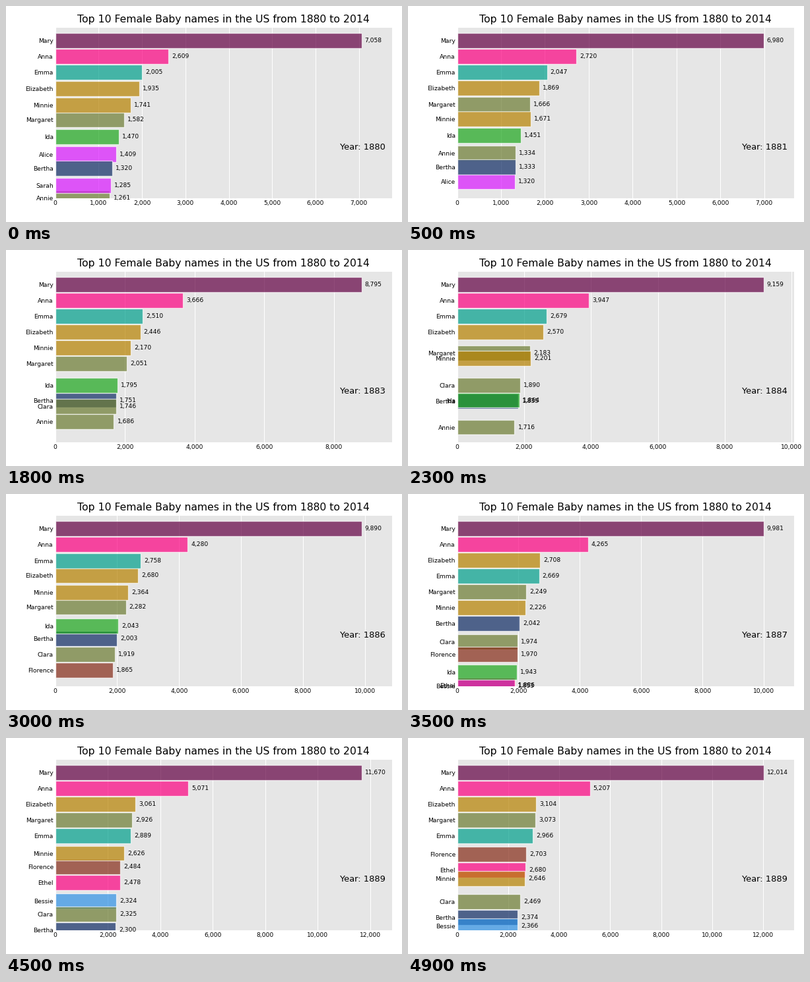
Animation of 600 by 328 pixels, one loop 5000 ms. Source, as a matplotlib script:

```python
import matplotlib.pyplot as plt
import numpy as np
from matplotlib.animation import FuncAnimation
from matplotlib.ticker import MultipleLocator, StrMethodFormatter

DPI = 64
PT = 93.75 / DPI  # type and line sizes are set for 93.75 dpi
FIRST_YEAR, N_YEARS, N_BARS = 1880, 11, 10
STEPS_PER_YEAR = 5

OLIVE, OCHRE, PINK, VIOLET = "#6C7C32", "#B68100", "#FC0080", "#DA16FF"

# name: (colour, first year counted, births per year)
BIRTHS = {
    "Alice": (VIOLET, 1880, [1414, 1308, 1542, 1488]),
    "Anna": (PINK, 1880, [2604, 2698, 3143, 3306, 3860, 3994, 4283, 4227,
                          4982, 5062, 5233]),
    "Annie": (OLIVE, 1880, [1258, 1326, 1492, 1589, 1739, 1703, 1740]),
    "Bertha": ("#0D2A63", 1880, [1320, 1324, 1508, 1681, 1789, 1860, 2002,
                                 2020, 2450, 2295, 2388]),
    "Bessie": ("#2E91E5", 1887, [1830, 2286, 2321, 2374]),
    "Clara": (OLIVE, 1880, [1226, 1242, 1490, 1548, 1852, 1910, 1917, 1960,
                            2231, 2316, 2496]),
    "Elizabeth": (OCHRE, 1880, [1939, 1852, 2187, 2255, 2549, 2582, 2680,
                                2681, 3224, 3058, 3112]),
    "Emma": ("#00A08B", 1880, [2003, 2034, 2303, 2367, 2587, 2728, 2764,
                               2647, 3087, 2884, 2980]),
    "Ethel": (PINK, 1887, [1860, 2373, 2465, 2718]),
    "Florence": ("#862A16", 1885, [1641, 1861, 1945, 2442, 2470, 2744]),
    "Ida": ("#1CA71C", 1880, [1472, 1439, 1673, 1634, 1882, 1854, 2049,
                              1929, 2200]),
    "Margaret": (OLIVE, 1880, [1578, 1658, 1821, 1881, 2142, 2205, 2286,
                               2215, 2904, 2917, 3100]),
    "Mary": ("#620042", 1880, [7065, 6919, 8148, 8012, 9217, 9128, 9890,
                               9888, 11754, 11648, 12078]),
    "Minnie": (OCHRE, 1880, [1746, 1653, 2004, 2035, 2243, 2178, 2372, 2203,
                             2653, 2625, 2650]),
    "Sarah": (VIOLET, 1880, [1288, 1226]),
}

names = list(BIRTHS)
colors = [color for color, _, _ in BIRTHS.values()]
values = np.zeros((N_YEARS, len(names)))
for col, (_, start, counts) in enumerate(BIRTHS.values()):
    row = start - FIRST_YEAR
    values[row:row + len(counts), col] = counts

# Slot 10 is the top bar; everything outside the top ten waits in slot 0.
ranks = (-values).argsort(axis=1).argsort(axis=1)
slots = np.clip(N_BARS - ranks, 0, None)

plt.rcParams.update({
    "font.family": "DejaVu Sans",
    "axes.spines.left": False, "axes.spines.right": False,
    "axes.spines.top": False, "axes.spines.bottom": False,
    "axes.facecolor": "0.9", "axes.axisbelow": True,
    "axes.grid": True, "axes.grid.axis": "x",
    "grid.color": "white", "grid.linewidth": 0.8 * PT,
    "axes.titlesize": 12 * PT, "axes.titlepad": 6 * PT,
    "xtick.labelsize": 7 * PT, "ytick.labelsize": 7 * PT,
    "xtick.major.size": 0, "ytick.major.size": 0,
    "xtick.major.pad": 2 * PT, "ytick.major.pad": 2 * PT,
})

fig = plt.figure(figsize=(600 / DPI, 328 / DPI), dpi=DPI, facecolor="white")
left, bottom, right, top = 74.5 / 600, 0.11, 0.975, 0.9
ax = fig.add_axes([left, bottom, right - left, top - bottom])


def blend(table, year, part):
    return table[year] * (1 - part) + table[year + 1] * part


def draw(frame):
    year, step = divmod(frame, STEPS_PER_YEAR)
    part = 0.05 + step / STEPS_PER_YEAR
    slot, length = blend(slots, year, part), blend(values, year, part)
    shown = np.flatnonzero(slot > 1e-6)
    limit = 1.1 * length.max()

    ax.clear()
    ax.barh(slot[shown], length[shown], height=0.95, alpha=0.7,
            color=[colors[i] for i in shown], edgecolor="white",
            linewidth=PT, tick_label=[names[i] for i in shown])
    ax.set_xlim(0, limit)
    # The view grows downwards once the first bar has left the chart.
    ax.set_ylim(0.15 if year == 0 else 0.05, N_BARS + 0.8)
    ax.xaxis.set_major_locator(MultipleLocator(1000 if limit < 9000 else 2000))
    ax.xaxis.set_major_formatter(StrMethodFormatter("{x:,.0f}"))

    for i in shown:
        ax.text(length[i] + 0.01 * limit, slot[i], f"{length[i]:,.0f}",
                ha="left", va="center", size=7 * PT)
    ax.text(0.98, 0.3, f"Year: {FIRST_YEAR + year}", transform=ax.transAxes,
            ha="right", va="center", size=10 * PT)
    ax.set_title("Top 10 Female Baby names in the US from 1880 to 2014")


anim = FuncAnimation(fig, draw, frames=(N_YEARS - 1) * STEPS_PER_YEAR,
                     init_func=lambda: None, interval=100,
                     repeat=True, repeat_delay=0)
plt.show()
```
